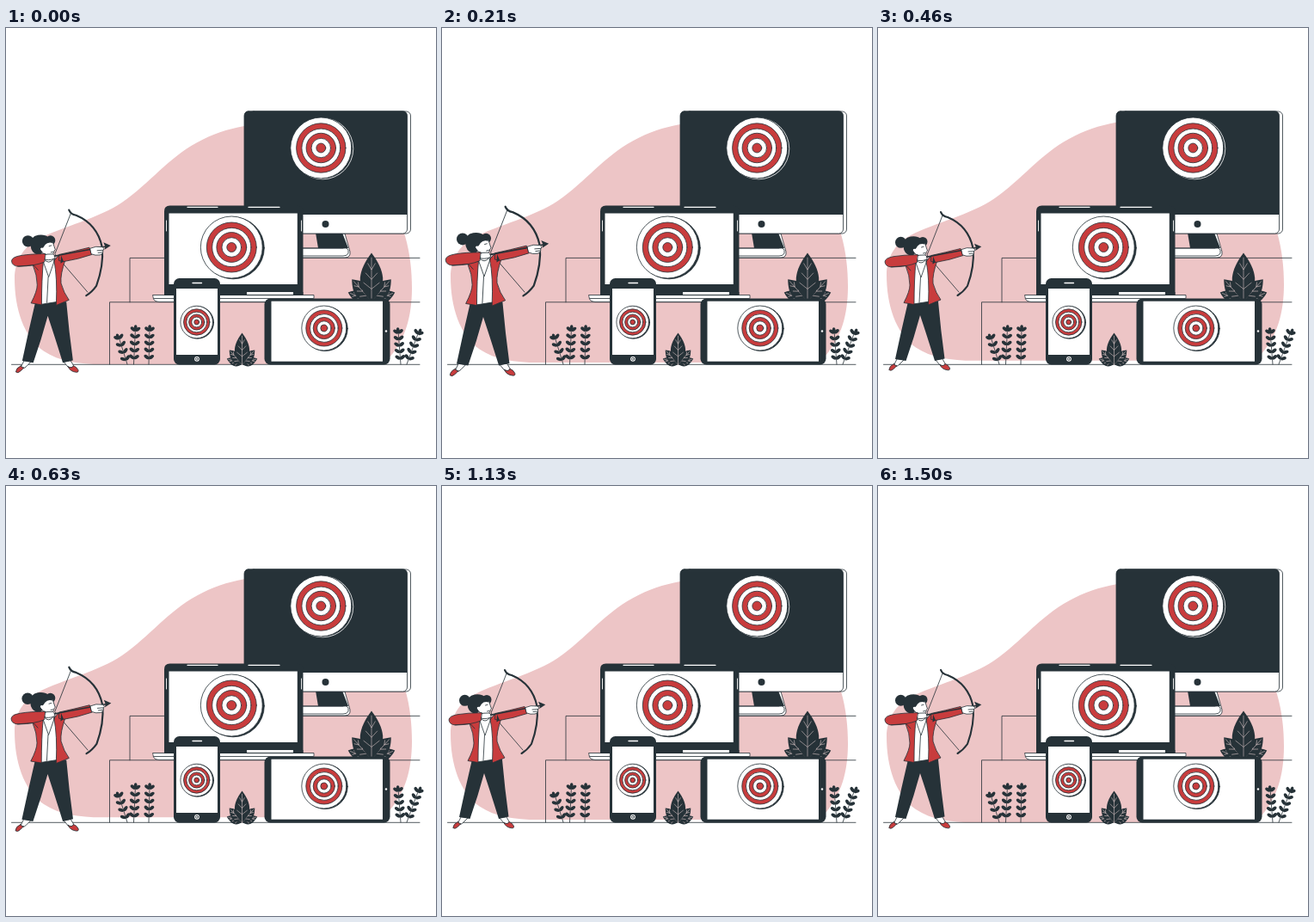
Animation of 500 by 500 pixels, one loop 1540 ms. Source, as an HTML page:

```html
<!DOCTYPE html>
<html lang="en">
<head>
<meta charset="utf-8">
<title>Archer and devices</title>
<style>
html, body { margin: 0; width: 100%; height: 100%; overflow: hidden; background: #fff; }
svg { display: block; width: 100%; height: 100%; }
.d { fill: #263238; }
.r { fill: #c83c3d; }
.w { fill: #fff; }
.o { stroke: #263238; stroke-width: .8; stroke-linejoin: round; stroke-linecap: round; }
.l { fill: none; stroke: #263238; stroke-width: .8; stroke-linecap: round; stroke-linejoin: round; }
.v { fill: none; stroke: #f3dada; stroke-width: .5; stroke-linecap: round; }
.s { fill: none; stroke: #fff; stroke-width: 1.3; stroke-linecap: round; }
.e { stroke: #fff; stroke-width: .8; }
</style>
</head>
<body>
<svg viewBox="0 0 500 500">
  <path id="blob" fill="#edc5c6" d="M10 291C10 273 19 255 38 245.500C66 231 107 222 135 203C168 180 188 152 222 133.500
    C240 123.500 257 118 277 114.300C330 101 390 118 425 165C446 193 457 221 464 242C470 263 472 283 472 303
    C472 336 464 362 447 382C441 389 424 391.300 400 391.300H112C84 391.300 62 388 44 376C20 359 10 326 10 291Z"/>

  <path class="l" d="M6.500 391.300H481M120.500 391V318.800H481M144 318.800V267.400H481"/>

  <g id="monitor">
    <path class="w o" d="M387 238L394 239L400 260Q401 267 394 267H342V256H392Z"/>
    <path class="d" d="M360 238H391L398 256H363Z"/>
    <path class="l" d="M342 256H396Q399 257 398 262Q397 265 392 265H342"/>
    <rect class="w o" x="283" y="97" width="187.500" height="142" rx="5"/>
    <rect class="w o" x="277" y="97" width="189.500" height="142" rx="5"/>
    <path class="d" d="M277 217V102Q277 96.500 282 96.500H461Q466.500 96.500 466.500 102V217Z"/>
    <circle class="d" cx="371.500" cy="228" r="4"/>
  </g>

  <g id="laptop">
    <path class="d" d="M184 312V213Q184 206.500 190.500 206.500H339Q345.500 206.500 345.500 213V312Z"/>
    <rect class="w" x="189.500" y="215.500" width="149.300" height="82.500"/>
    <path class="s" d="M211 208.300H246M282 208.300H318"/>
    <path class="s" style="stroke-width:.9" d="M186.500 224V236M343.500 224V236"/>
    <path class="w o" d="M171 310.500H358V314Q357 318.500 351 318.500H178Q171 318 171 313Z"/>
    <path class="l" d="M172 314.500H357"/>
    <path class="d" d="M184 307H345.500V311H184Z"/>
    <rect class="w" x="280" y="307" width="54" height="3"/>
  </g>

  <g id="plants"></g>

  <g id="phone">
    <rect class="d" x="195" y="291" width="54" height="100.500" rx="6.500"/>
    <rect class="w" x="198" y="303" width="48" height="77"/>
    <path class="s" d="M217 296.500H227.500"/>
    <circle class="w" cx="222" cy="384.800" r="2.900"/>
    <circle class="l" cx="222" cy="384.800" r="1.500"/>
  </g>

  <g id="tablet">
    <rect class="d" x="300.500" y="314.500" width="146" height="77" rx="7"/>
    <rect class="w" x="308.500" y="317.700" width="129.500" height="70"/>
    <circle class="w" cx="442" cy="352.500" r="1.200"/>
  </g>

  <g id="targets"></g>

  <g id="archer">
    <path class="l" d="M75 218L57 264L94 307"/>
    <path class="w o" d="M22 385L19 391Q20 396 25 391L30 386Z"/>
    <path class="r o" d="M18.500 390.500Q13 393 12.800 397.500Q15 399.500 18 396.500Q21 394 22 392.500Q19 393 18.500 390.500Z"/>
    <path class="w o" d="M67 386L72 392Q78 394 78 390L75 385Z"/>
    <path class="r o" d="M72 391.500Q74 397 81 397.800Q84.500 398 83.300 395Q81.500 391.500 78 390.500Q76.500 394 72 391.500Z"/>
    <path class="d" d="M35 318H70Q73 352 77.500 384.500L66 387Q57 358 49 334Q42 360 32.500 387L20 385Q27 352 35 318Z"/>
    <path class="w o" d="M42 271L61 269L60 318L41 321Z"/>
    <path class="r o" d="M44 271Q42 294 42 321.500L30 319.500Q37 306 37 299Q37 288 32 276Z"/>
    <path class="r o" d="M56 271L61 266L69 270Q63 287 64 297Q67 308 73 316L58.500 322Q60 290 56 271Z"/>
    <path class="l" d="M44 273L50 290L57 270M49.500 290L48 319"/>
    <path class="w o" d="M45 261L45 270Q50 276 55 270L53 262Z"/>
    <circle class="d" cx="26.500" cy="249.300" r="6.500"/>
    <circle class="d" cx="52" cy="248.500" r="5.500"/>
    <path class="w o" d="M39 251Q48 248 54.500 250Q56 255 57.500 259Q55.500 260 56 262Q55 265.500 50.500 265Q43 265 40 258Z"/>
    <path class="d" d="M29.500 254Q29 244 38 242.500Q46 241.500 49.500 245Q54 248 54.500 251.500Q49 250 46 253.500Q44.500 256 43.500 257Q40.500 256 40.500 259Q42 261 43 262Q41 265.500 37 264.500Q30 262 29.500 254Z"/>
    <path class="l" d="M50.500 255L53 254.300M52.500 262L55 261.500"/>
    <path class="w o" d="M43 265.500Q48 263.500 55 264Q58 265.500 57 268.500Q54 271 47 270.500Z"/>
    <path class="r o" d="M46 263.700Q30 263.700 18 265.700Q8 267.500 8 272Q8.500 277.500 16 278Q35 277.500 45 273Z"/>
    <path class="l" d="M15 277.800L33 276.500L38 282"/>
    <path class="r o" d="M62 264.500Q78 261 96 256.500L99 264.500Q83 270 67 272.500L62 271.500Z"/>
    <path class="d" d="M64 265.500L67 272.500L63.500 274.500Z"/>
    <path d="M56 266.300L115 255.300" fill="none" stroke="#263238" stroke-width="1.500"/>
    <path d="M73 214Q75 219 81 220Q105 230 110.500 256Q112.500 277 104 300Q99 307 92.500 311" fill="none" stroke="#263238" stroke-width="2.100" stroke-linecap="round"/>
    <path class="w o" d="M97 257.500Q103 254.500 111 256Q114 258 111.500 260Q112 264 108 265Q103 266 98.500 264Z"/>
    <path class="l" d="M105 260L111.500 259.500M106 262.500L110.500 262"/>
    <path class="d" d="M112 250.800L120.300 254.300L113.200 259L114 255.300Z"/>
  </g>
</svg>
<script>
const byId = id => document.getElementById(id);

// Round board with a rim on its right side
function target(x, y, size, red, rim = 'd o') {
  const disc = (r, cls, dx = 0) => `<circle class="${cls}" cx="${x + dx}" cy="${y + dx * .4}" r="${r}"/>`;
  const rings = [1, .78, .6, .39, .19].map((k, i) => disc(red * k, i % 2 ? 'w o' : 'r o')).join('');
  return disc(size, rim, size / 18) + disc(size, 'w o') + rings;
}

byId('targets').innerHTML =
  target(366.3, 139.5, 35.5, 28.7, 'd e') + target(262.3, 255, 36, 29) +
  target(221.7, 342, 18.8, 15.2) + target(369.8, 349, 26, 21);

// Broad leaf with veins, growing up from its base
function leaf(x, y, len, half, turn) {
  let veins = `M0 0V${-len * .9}`;
  for (let k = .25; k < .7; k += .2) {
    const w = half * (1 - k) * .9;
    veins += `M${-w} ${-len * (k + .13)}L0 ${-len * k}L${w} ${-len * (k + .13)}`;
  }
  return `<g transform="translate(${x} ${y}) rotate(${turn})">
    <path class="d" d="M0 0C${-half * 1.5} ${-len * .3} ${-half * 1.1} ${-len * .65} 0 ${-len}
      C${half * 1.1} ${-len * .65} ${half * 1.5} ${-len * .3} 0 0Z"/>
    <path class="v" d="${veins}"/></g>`;
}

function bush(x, y, s) {
  return [[29, 8, -70], [29, 8, 70], [34, 9.5, -42], [34, 9.5, 42], [56, 13.5, 0]]
    .map(([len, half, turn]) => leaf(x, y, len * s, half * s, turn)).join('');
}

// Thin stem with paired oval leaves and one at the tip
function sprig(x0, y0, x1, y1, pairs) {
  const lean = Math.atan2(x1 - x0, y0 - y1) * 180 / Math.PI;
  const oval = (x, y, a, s) => `<ellipse class="d" rx="${2.2 * s}" ry="${3.9 * s}"
    transform="translate(${x} ${y}) rotate(${a}) translate(0 ${-4 * s})"/>`;
  let out = `<path class="l" d="M${x0} ${y0}L${x1} ${y1}"/>`;
  for (let i = 0; i < pairs; i++) {
    const k = .15 + .77 * i / (pairs - 1);
    const x = x0 + (x1 - x0) * k, y = y0 + (y1 - y0) * k;
    out += oval(x, y, lean - 52, .88) + oval(x, y, lean + 52, .88);
  }
  return out + oval(x1, y1 + 3, lean, .85);
}

byId('plants').innerHTML =
  bush(425, 317.5, 1) + bush(274.5, 391, .65) +
  sprig(141, 391, 131, 359, 4) + sprig(148.5, 391, 150.5, 349, 5) + sprig(166, 391, 167, 349, 5) +
  sprig(459, 391, 456, 352, 5) + sprig(466, 391, 480, 353, 5);

const LOOP = 1540, SHIFT = 40;
const BEAT = [[0, 1], [.1, 1.1], [.3, 1], [.4, 1], [.5, 1.1], [.6, 1], [1, 1]];

function along(keys, p) {
  const i = keys.findIndex(k => k[0] > p);
  const [a, va] = keys[i - 1], [b, vb] = keys[i];
  return va + (vb - va) * (p - a) / (b - a);
}

function draw(ms) {
  const p = (ms + SHIFT) % LOOP / LOOP;
  const rise = 1 - Math.abs(1 - 2 * p);
  byId('blob').setAttribute('transform', `translate(0 ${-7 * rise})`);
  byId('archer').setAttribute('transform',
    `translate(64 305.5) scale(${along(BEAT, p)}) translate(-64 -305.5)`);
}

const start = performance.now();
function tick() {
  draw(performance.now() - start);
  requestAnimationFrame(tick);
}
tick();
</script>
</body>
</html>
```
